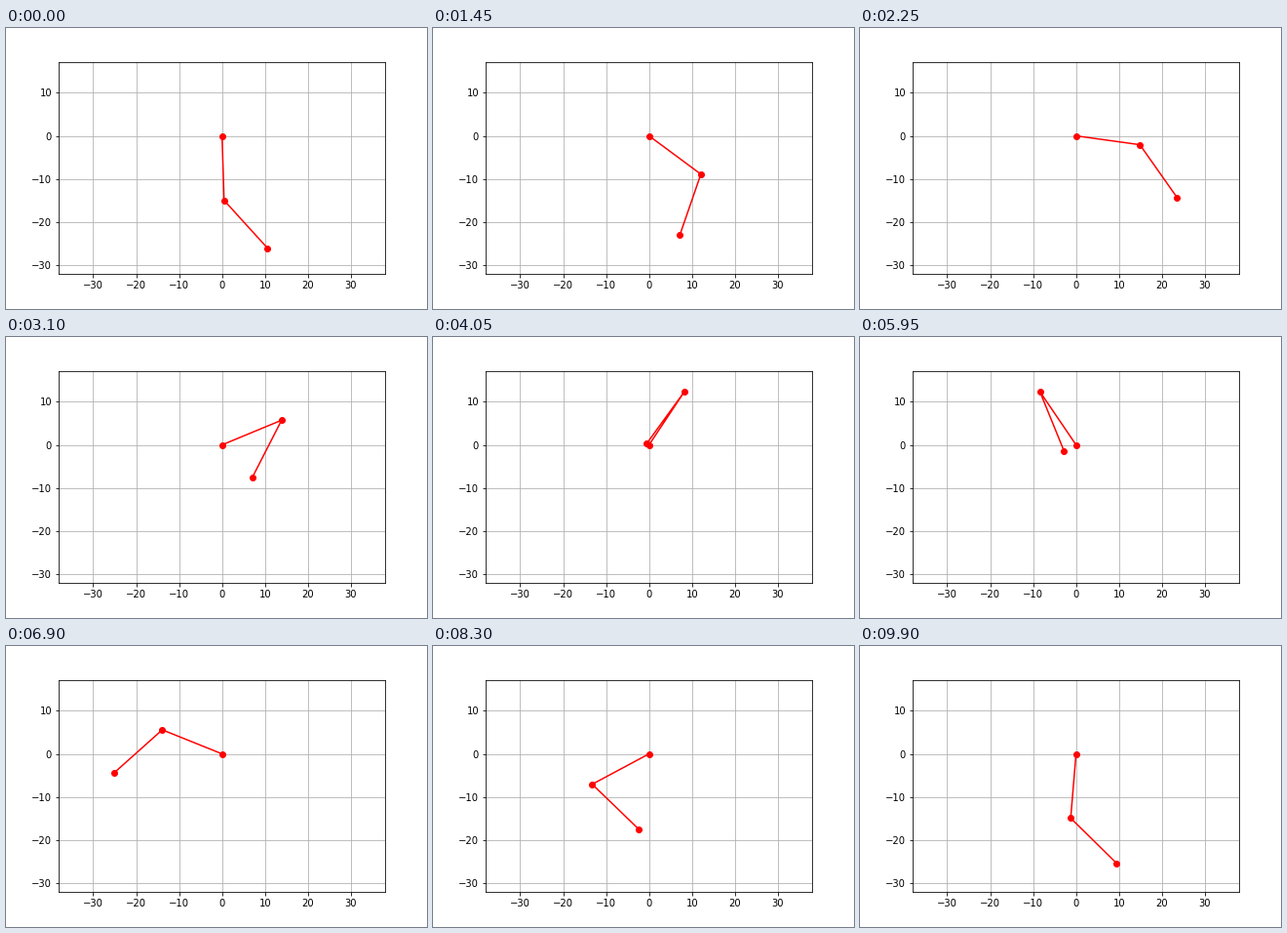
Recreate the animation shown at these times as a matplotlib script. Size 432 px wide and 288 px high, loop 9.95 s.

```python
import numpy as np
import matplotlib.pyplot as plt
from matplotlib.animation import FuncAnimation

FRAMES = 199
INTERVAL = 50
ARM = 15
TURN = 6.2 / FRAMES            # crank rotation per step, rad
SWING = np.radians(32.437)     # pendulum phase per step
AMPLITUDE = np.radians(50)
PHASE_SHIFT = np.radians(6.9)  # slow phase drift over one turn


def linkage(frame):
    """Pivot, joint and bob positions; angles are measured from straight down."""
    step = frame + 1
    crank = TURN * step
    bob = AMPLITUDE * np.cos(SWING * step - PHASE_SHIFT * np.sin(crank))
    links = [(ARM * np.sin(a), -ARM * np.cos(a)) for a in (crank, bob)]
    return np.cumsum([(0, 0)] + links, axis=0)


fig, ax = plt.subplots(figsize=(6, 4), dpi=72)
fig.subplots_adjust(left=0.125, right=0.9, bottom=0.125, top=0.88)
ax.grid(True)
line, = ax.plot([], [], "ro-")

# Fit the view to the whole motion.
ax.update_datalim(np.vstack([linkage(i) for i in range(FRAMES)]))
ax.axis("equal")
ax.autoscale_view()


def update(frame):
    line.set_data(*linkage(frame).T)
    return line,


anim = FuncAnimation(fig, update, frames=FRAMES, interval=INTERVAL,
                     repeat=True, repeat_delay=0)
plt.show()
```
